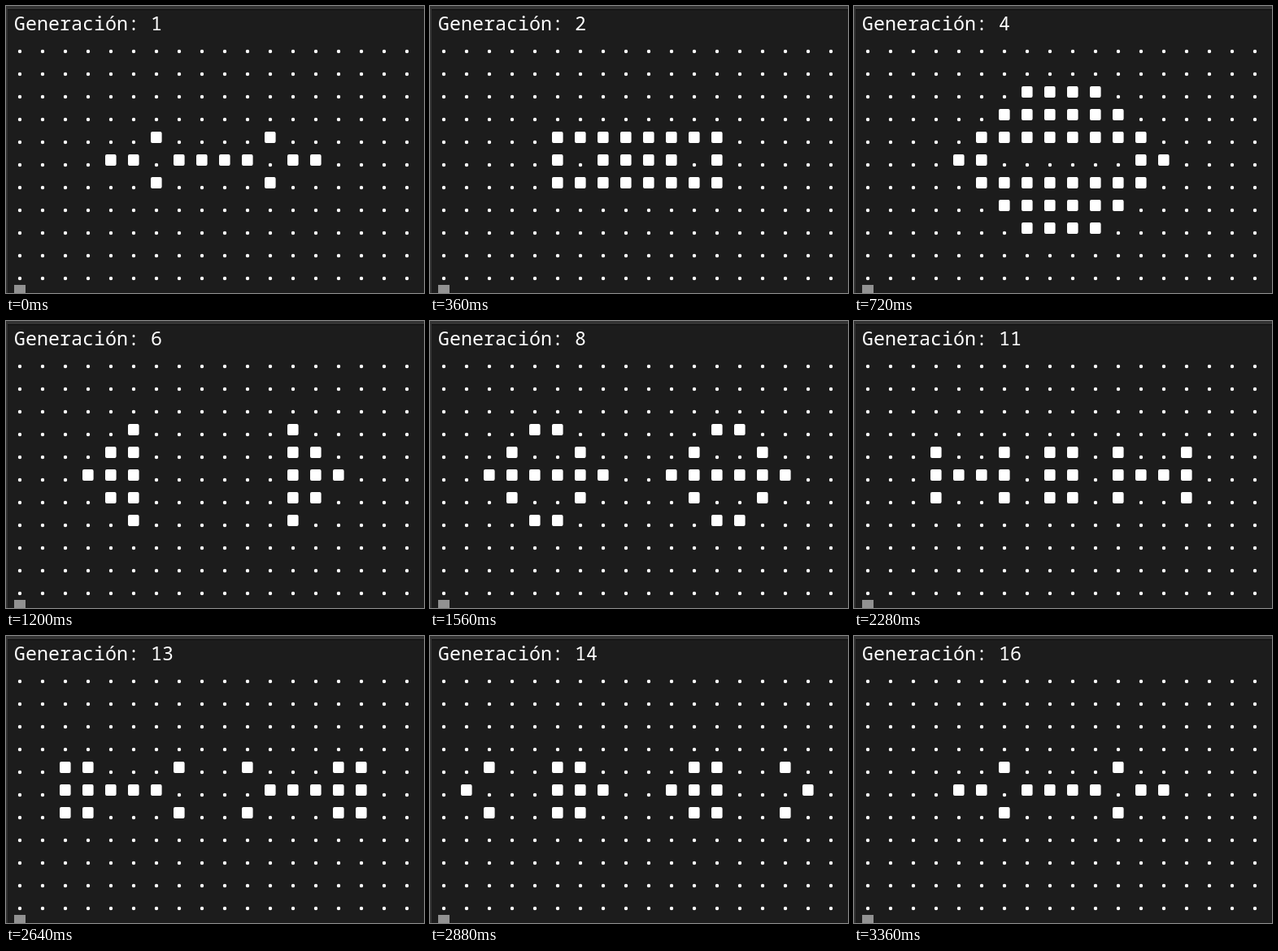
These frames come from a looping animation (514x354 px, 3480 ms). An HTML page:

```html
<!DOCTYPE html>
<html lang="es">
<head>
<meta charset="utf-8">
<title>Juego de la vida</title>
<style>
html, body { margin: 0; height: 100%; overflow: hidden; background: #1c1c1c; }
svg { display: block; }
text { font: 500 23.33px "Noto Sans Mono", "DejaVu Sans Mono", monospace; fill: #fff; white-space: pre; }
#dots { stroke: #fff; stroke-width: 4.4; stroke-linecap: round; }
#cells { fill: #fff; stroke: #fff; stroke-width: 4; stroke-linejoin: round; }
</style>
</head>
<body>
<svg width="514" height="354" viewBox="0 0 514 354">
  <path fill="#1c1c1c" d="M0 0h514v354H0z"/>
  <path fill="#343434" d="M0 0h514v4H0zM0 4h2v350H0z"/>
  <path fill="#0c0c0c" d="M2 4h512v1H2z"/>
  <path fill="#929292" d="M10 344h14v10H10z"/>
  <text id="label" x="10" y="30"></text>
  <path id="dots"/>
  <path id="cells"/>
</svg>
<script>
const COLS = 18, ROWS = 11, LOOP = 3480, TICK = 120, GENERATIONS = 16;
const $ = id => document.getElementById(id);
const range = n => [...Array(n).keys()];

// Pentadecathlon, one string per row
const seed = range(ROWS).map(r => {
  const row = { 4: '......#....#', 5: '....##.####.##', 6: '......#....#' }[r] || '';
  return range(COLS).map(c => row[c] === '#' ? 1 : 0);
});

const evolve = grid => grid.map((row, r) => row.map((alive, c) => {
  let near = -alive;
  for (let y = r - 1; y <= r + 1; y++)
    for (let x = c - 1; x <= c + 1; x++) near += grid[y]?.[x] || 0;
  return near === 3 || (alive && near === 2) ? 1 : 0;
}));

const history = [seed];
while (history.length < GENERATIONS) history.push(evolve(history.at(-1)));

let shown = -1;
function show(index) {
  let dots = '', cells = '';
  history[index].forEach((row, r) => row.forEach((alive, c) => {
    const x = 10 + 28 * c, y = 43 + 28 * r;
    if (alive) cells += `M${x + 2} ${y + 2}h9.6v10h-9.6z`;
    else dots += `M${x + 7} ${y + 13}h0`;
  }));
  $('dots').setAttribute('d', dots);
  $('cells').setAttribute('d', cells);
  $('label').textContent = `Generación: ${index + 1}`;
  shown = index;
}

// A generation lasts 220 ms, shown on the next 120 ms tick
function frame() {
  const tick = Math.floor(performance.now() % LOOP / TICK);
  const index = Math.floor(tick * 6 / 11);
  if (index !== shown) show(index);
  requestAnimationFrame(frame);
}
frame();
</script>
</body>
</html>
```
